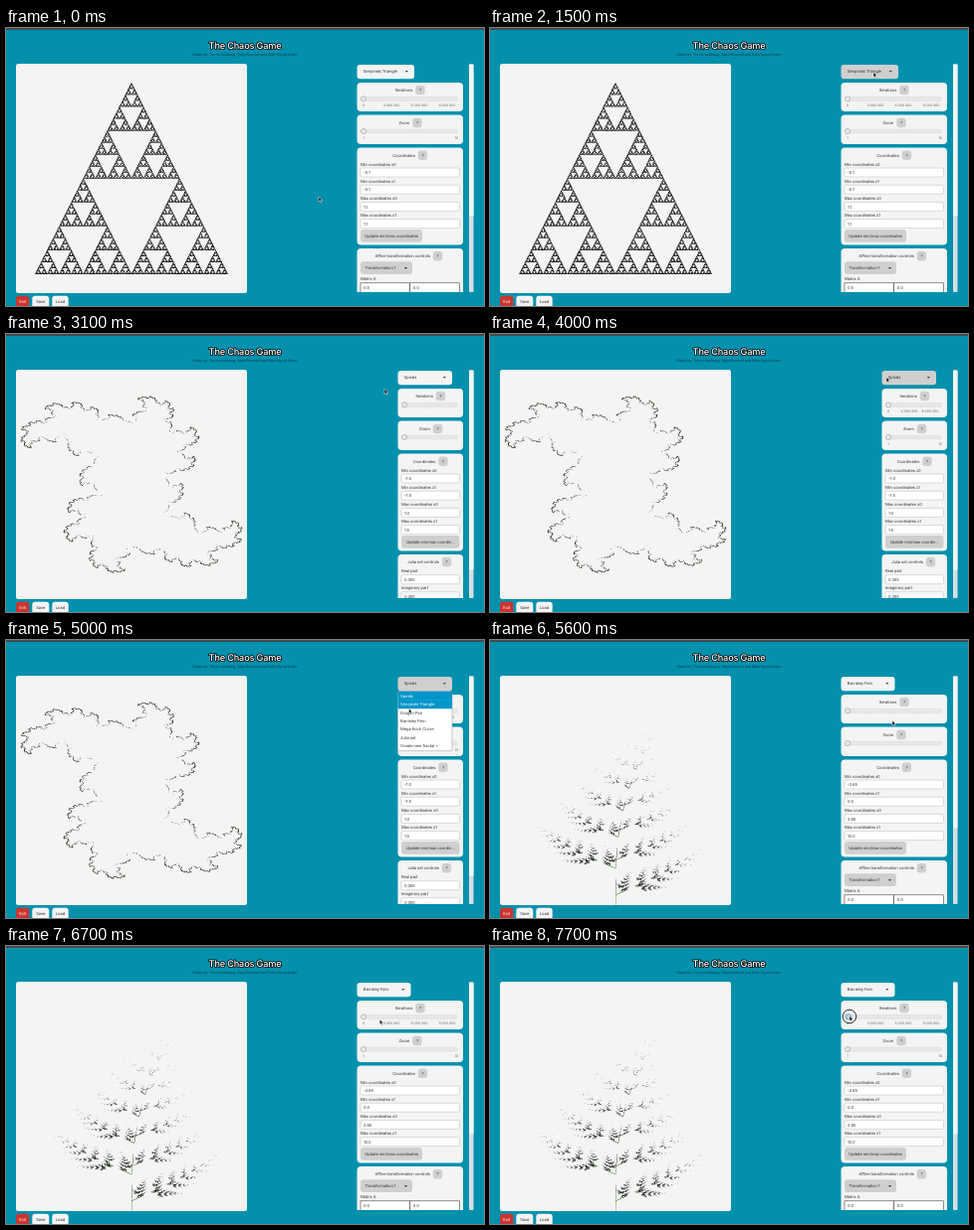
Write an HTML page with a canvas that moves like this. It is 480 by 280 pixels and loops after 8000 ms.

```html
<!DOCTYPE html>
<html lang="en">
<head>
<meta charset="utf-8">
<title>The Chaos Game</title>
<style>
  html, body { margin: 0; width: 100%; height: 100%; overflow: hidden; background: #0390ad; }
  canvas, svg { position: absolute; left: 0; top: 0; }
  canvas { left: 10px; top: 36px; width: 232px; height: 231px; border-radius: 2.5px; background: #f4f4f4; }
  text { font: 4.1px Inter, Roboto, sans-serif; letter-spacing: -.02em; fill: #333; text-rendering: geometricPrecision; }
  .title { font-size: 9.2px; font-weight: 500; fill: #fff; stroke: #000; stroke-width: 1.5px; stroke-linejoin: round; paint-order: stroke; }
  .by { font-size: 3.7px; fill: #0b3f4b; }
  .tick { font-size: 3.5px; fill: #666; }
  .mid { text-anchor: middle; }
  .end { text-anchor: end; }
  .light { fill: #fff; }
</style>
</head>
<body>
<canvas id="triangle"></canvas>
<canvas id="spirals"></canvas>
<canvas id="fern"></canvas>
<svg id="stage" width="480" height="280" viewBox="0 0 480 280"></svg>
<script>
const LOOP = 8000, RIGHT = 459;
const PALE = '#f4f4f4', GREY = '#cfcfcf';
const WIDE = 352.5, NARROW = 393.5;
const ITEMS = ['Spirals', 'Sierpinski Triangle', 'Dragon Fire', 'Barnsley Fern',
  'Mega Koch Curve', 'Julia set', 'Create new fractal +'];
const $ = id => document.getElementById(id);

// ---- Fractals ----
function random(seed) {
  return () => {
    seed = (seed + 0x6D2B79F5) | 0;
    let n = Math.imul(seed ^ (seed >>> 15), 1 | seed);
    n = (n + Math.imul(n ^ (n >>> 7), 61 | n)) ^ n;
    return ((n ^ (n >>> 14)) >>> 0) / 4294967296;
  };
}

const affine = maps => (x, y, r) => {
  const [a, b, c, d, e, f] = maps[Math.floor(r * maps.length)];
  return [a * x + b * y + e, c * x + d * y + f];
};

// Inverse Julia step: one of the two roots of z - c
const julia = (re, im) => (x, y, r) => {
  const u = x - re, v = y - im, m = Math.hypot(u, v), s = r < .5 ? 1 : -1;
  return [s * Math.sqrt((m + u) / 2), s * Math.sign(v) * Math.sqrt((m - u) / 2)];
};

// Counts hits on a grid three times finer than the panel, then averages it down
function plot(id, next, [x0, y0, x1, y1]) {
  const cv = $(id), fine = 3, w = cv.width = 232, h = cv.height = 231;
  const W = w * fine, H = h * fine, hits = new Uint32Array(W * H), rnd = random(7);
  let x = 0, y = 0;
  for (let i = 0; i < 100000; i++) {
    [x, y] = next(x, y, rnd());
    const px = Math.floor((x - x0) / (x1 - x0) * W);
    const py = Math.floor((y1 - y) / (y1 - y0) * H);
    if (i > 20 && px >= 0 && px < W && py >= 0 && py < H) hits[py * W + px]++;
  }
  const ctx = cv.getContext('2d'), img = ctx.createImageData(w, h);
  for (let p = 0; p < w * h; p++) {
    const corner = Math.floor(p / w) * fine * W + p % w * fine;
    let inked = 0, green = 0;
    for (let k = 0; k < fine * fine; k++) {
      const n = hits[corner + Math.floor(k / fine) * W + k % fine];
      if (n) inked++;
      green += Math.max(0, Math.min(140, (n - 30) * 1.2));
    }
    img.data[p * 4] = green / inked * .4;
    img.data[p * 4 + 1] = green / inked;
    img.data[p * 4 + 3] = 255 * inked / fine ** 2;
  }
  ctx.putImageData(img, 0, 0);
}

plot('triangle', affine([
  [.5, 0, 0, .5, 0, 0], [.5, 0, 0, .5, .25, .5], [.5, 0, 0, .5, .5, 0]
]), [-.1, -.1, 1.1, 1.1]);
plot('spirals', julia(.355, .355), [-1, -1.5, 1, 1.5]);
plot('fern', affine([
  [0, 0, 0, .16, 0, 0], [.85, .04, -.04, .85, 0, 1.6],
  [.2, -.26, .23, .22, 0, 1.6], [-.15, .28, .26, .24, 0, .44]
]), [-2.65, 0, 2.65, 10]);

// ---- Interface ----
const rect = (x, y, w, h, fill, r = 0, more = '') =>
  `<rect x="${x}" y="${y}" width="${w}" height="${h}" rx="${r}" fill="${fill}" ${more}/>`;
const text = (x, y, s, cls = '') => `<text x="${x}" y="${y}" class="${cls}">${s}</text>`;
const group = (id, body) => `<g id="${id}">${body}</g>`;
const arrow = (x, y) => `<path d="M${x - 1.6} ${y - .9}h3.2l-1.6 1.8z" fill="#444"/>`;
const button = (x, y, w, h, s, fill = PALE, cls = '') =>
  rect(x, y, w, h, fill, 3) + text(x + w / 2, y + h / 2 + 1.5, s, 'mid ' + cls);
const field = (x, y, w, s) =>
  rect(x, y, w, 9, '#fff', 1.5, 'stroke="#c4c4c4" stroke-width=".6"') + text(x + 3, y + 6.1, s);

// Card with a centred heading of width w, followed by a help button
function card(left, y, h, s, w, headY) {
  const q = (left + RIGHT) / 2 + w / 2 - 3;
  return rect(left, y, RIGHT - left, h, PALE, 4) +
    text(q - 3, headY + 1.5, s, 'end') + button(q, headY - 4.7, 9.4, 9.4, '?', GREY);
}

function slider(left, y, ticks) {
  const x = left + 6, w = 453.5 - x;
  let s = rect(x, y - 1.7, w, 3.4, '#e8e8e8', 1.5, 'stroke="#d4d4d4" stroke-width=".5"');
  if (ticks) {
    let d = '';
    for (let i = 1; i <= w / 3; i++) d += `M${x + i * 3} ${y + 1.7}v1.7`;
    s += `<path d="${d}" stroke="#d2d2d2" stroke-width=".5"/>`;
  }
  return s + `<circle cx="${x + .5}" cy="${y}" r="2.6" fill="#e9e9e9" stroke="#999" stroke-width=".6"/>`;
}

function sidebar(id, left, boxW, name, coords, marks, controls) {
  const x = left + 3.5, w = 455.5 - x, narrow = left === NARROW;
  const names = ['Min coordinates x0', 'Min coordinates x1', 'Max coordinates x0', 'Max coordinates x1'];
  return group(id,
    rect(left, 37, boxW, 14.3, PALE, 3, `id="${id}Box"`) +
    text(left + 6.3, 45.4, name) + arrow(left + boxW - 7.7, 43.8) +
    card(left, 55, 29, 'Iterations', 17, 62.5) + slider(left, 71.3, true) +
    card(left, 87.5, 29.5, 'Zoom', 11, 95.5) + slider(left, 104, false) +
    group(id + 'Marks',
      marks.map(([mx, s]) => text(mx, 79, s, 'tick mid')).join('') +
      text(left + 6.5, 112, '1', 'tick mid') + text(452.5, 112, '10', 'tick mid')) +
    card(left, 120.5, 98, 'Coordinates', 22, 128.2) +
    names.map((n, i) => text(x, 138.5 + i * 17.2, n) + field(x, 141 + i * 17.2, w, coords[i])).join('') +
    button(x, 203, narrow ? 58.5 : 62, 12.8, narrow ? 'Update min/max coordin…' : 'Update min/max coordinates', GREY) +
    `<g clip-path="url(#pane)">${controls(left, x, w)}</g>` +
    rect(465, 36.5, 4.5, 229.5, '#d5dfe2', 1) + rect(465, 36.5, 4.5, narrow ? 201 : 153, PALE, 1));
}

const matrix = a => (left, x, w) => {
  const line = 'stroke="#444" stroke-width=".6"';
  return card(left, 222, 60, 'Affine transformation controls', 52, 229.7) +
    rect(x, 235.3, 52, 12.8, GREY, 3) + text(x + 4.5, 243.2, 'Transformation 1') + arrow(x + 45.5, 242) +
    text(x, 254.3, 'Matrix A') +
    rect(x, 256.8, w / 2, 14, '#fff', 0, line) + rect(x + w / 2, 256.8, w / 2, 14, '#fff', 0, line) +
    text(x + 3, 262.6, a) + text(x + w / 2 + 3, 262.6, '0.0');
};

const juliaControls = (left, x, w) =>
  card(left, 222, 60, 'Julia set controls', 29, 229.7) +
  text(x, 240.2, 'Real part') + field(x, 242.7, w, '0.355') +
  text(x, 257.2, 'Imaginary part') + field(x, 259.7, w, '0.355');

function menu(id, left, w) {
  return group(id,
    rect(left, 51.7, w, 60, '#fff', 1, 'stroke="#9aa5a8" stroke-width=".6"') +
    ITEMS.map((s, i) => rect(left, 52 + i * 8.4, w, 8.8, '#0096c9', 0, `id="${id}Bar${i}"`)).join('') +
    ITEMS.map((s, i) => `<text id="${id}Item${i}" x="${left + 2.6}" y="${57.7 + i * 8.4}">${s}</text>`).join(''));
}

const millions = (from, step, ...xs) =>
  [[from, '0'], ...xs.map((x, i) => [x, `${(i + 1) * step} 000 000`])];
const wideMarks = millions(359, 3, 387, 415, 443);

$('stage').innerHTML =
  '<clipPath id="pane"><path d="M340 36H470V266H340z"/></clipPath>' +
  rect(0, 0, 480, 2, '#414c51') +
  text(240, 21.3, 'The Chaos Game', 'title mid') +
  text(240, 27.8, 'Made by: Torvin Askhaug, Selje Brunvoll and Eldis Nyrud Kvam', 'by mid') +
  button(10, 269.7, 13.3, 12, 'Exit', '#cb3530', 'light') +
  button(26.3, 269.7, 17, 12, 'Save') + button(46.3, 269.7, 16.4, 12, 'Load') +
  sidebar('sideA', WIDE, 57.5, 'Sierpinski Triangle', ['-0.1', '-0.1', '1.1', '1.1'], wideMarks, matrix('0.5')) +
  sidebar('sideB', NARROW, 54.5, 'Spirals', ['-1.0', '-1.5', '1.0', '1.5'], millions(400, 4, 421, 442), juliaControls) +
  sidebar('sideC', WIDE, 54, 'Barnsley Fern', ['-2.65', '0.0', '2.65', '10.0'], wideMarks, matrix('0.0')) +
  menu('menuA', WIDE, 57.5) + menu('menuB', NARROW, 54.5) +
  group('press',
    '<circle cx="360.3" cy="71.3" r="2.7" fill="#a9d5e8" stroke="#5b9fb8" stroke-width=".6"/>' +
    '<circle cx="361" cy="71" r="6.8" fill="none" stroke="#161616" stroke-width=".9"/>') +
  '<path id="cursor" d="M0 0v4.9l1.1-1 .8 1.8.9-.4-.8-1.7h1.5z" fill="#000" stroke="#fff" stroke-width=".5"/>';

// ---- Timeline ----
const PATH = [
  [0, 314, 170], [300, 314, 170], [500, 361, 90], [600, 361, 90], [1300, 385, 44.5],
  [2100, 385, 44.5], [2400, 381, 56], [2600, 381, 56], [2900, 380, 55.5],
  [3500, 380, 55.5], [4000, 398, 43.5], [4400, 398, 43.5], [5000, 404.5, 69],
  [5100, 404.5, 71], [5300, 404, 81], [6100, 404, 81], [7000, 361, 70.5], [8000, 361, 70.5]
];

const SPANS = {
  triangle: [0, 3100], sideA: [0, 3100], menuA: [1600, 3100],
  spirals: [3100, 5500], sideB: [3100, 5500], sideBMarks: [3400, 5500], menuB: [4400, 5500],
  fern: [5500, LOOP], sideC: [5500, LOOP], sideCMarks: [5900, LOOP], press: [7200, LOOP]
};

function cursorAt(t) {
  const i = Math.max(1, PATH.findIndex(p => p[0] >= t));
  const [t0, x0, y0] = PATH[i - 1], [t1, x1, y1] = PATH[i];
  const k = (t - t0) / (t1 - t0);
  return [x0 + (x1 - x0) * k, y0 + (y1 - y0) * k];
}

function light(id, chosen, hover) {
  ITEMS.forEach((_, i) => {
    const on = i === chosen || i === hover;
    $(id + 'Bar' + i).style.display = on ? '' : 'none';
    $(id + 'Item' + i).style.fill = on ? '#fff' : '';
  });
}

function draw() {
  const t = Math.floor(performance.now() % LOOP / 100) * 100;
  for (const id in SPANS) {
    const [on, off] = SPANS[id];
    $(id).style.display = t >= on && t < off ? '' : 'none';
  }
  const [x, y] = cursorAt(t);
  $('cursor').setAttribute('transform', `translate(${x} ${y})`);
  $('sideABox').style.fill = t >= 1200 ? GREY : PALE;
  $('sideBBox').style.fill = t >= 3900 ? GREY : PALE;
  const row = y < 52 ? -1 : Math.floor((y - 52) / 8.4);
  light('menuA', 1, row);
  light('menuB', 0, t >= 5000 && t < 5200 ? 1 : row);
  requestAnimationFrame(draw);
}
draw();
</script>
</body>
</html>
```
